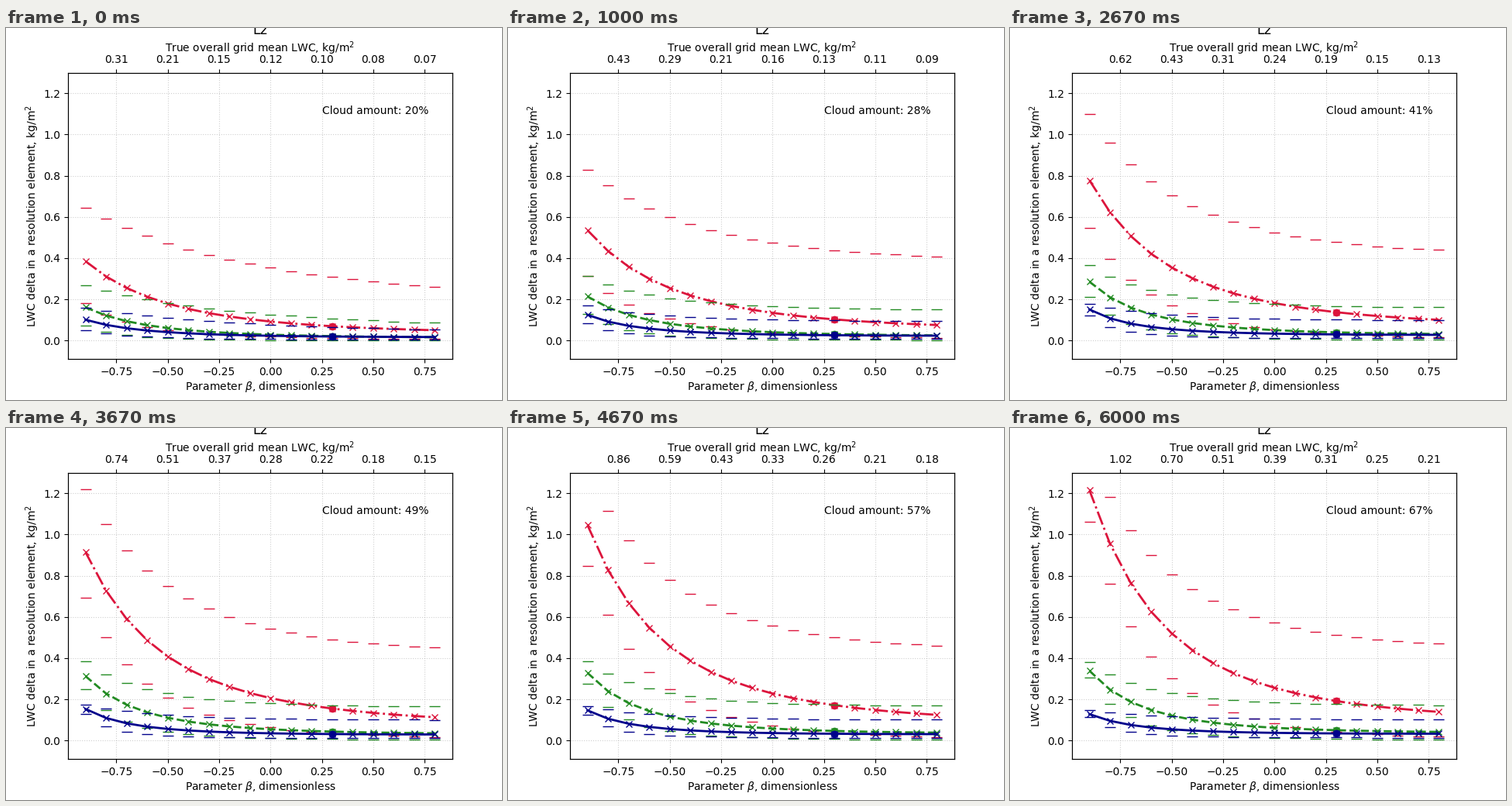
Recreate the animation shown at these times as a matplotlib script. Size 640x480 px, loop 6330 ms.

```python
import numpy as np
import matplotlib.pyplot as plt
from matplotlib.animation import FuncAnimation

FRAMES, LOOP_MS = 19, 6330
BETA = np.linspace(-0.9, 0.8, 18)
TICKS = np.linspace(-0.75, 0.75, 7)
HIGHLIGHT = 12  # index of beta = 0.3


def falling(left, right, bend):
    """Bent exponential decay whose ends drift with progress c in 0..1.

    left: start, end, hump; right: start, end, power; bend: start, end.
    """
    def value(count, c):
        s = np.linspace(0, 1, count)
        eased = c ** right[2]
        first = left[0] + (left[1] - left[0]) * c + left[2] * np.sin(np.pi * c)
        last = right[0] + (right[1] - right[0]) * eased
        curl = bend[0] + (bend[1] - bend[0]) * eased
        return last * (first / last) ** ((1 - s) * np.exp(-curl * s))
    return value


grid_mean = falling((0.308, 1.02, 0), (0.068, 0.21, 1), (0.61, 0.51))

# Colour, line style, then the mean, upper and lower curves.
STYLES = [
    ("crimson", "-.",
     falling((0.385, 1.214, 0.024), (0.050, 0.139, 0.7), (0.85, 0.97)),
     falling((0.644, 1.400, 0.120), (0.260, 0.471, 0.2), (0.63, 1.85)),
     falling((0.181, 1.062, -0.028), (0.008, 0.018, 0.3), (1.1, 0.42))),
    ("forestgreen", "--",
     falling((0.161, 0.338, 0.046), (0.016, 0.042, 0.6), (1.2, 1.75)),
     falling((0.268, 0.379, 0.050), (0.086, 0.172, 0.15), (0.6, 3.1)),
     falling((0.074, 0.304, 0.035), (0.001, 0.005, 0.5), (1.3, 1.3))),
    ("darkblue", "-",
     falling((0.101, 0.128, 0.038), (0.017, 0.033, 0.5), (1.9, 3.1)),
     falling((0.159, 0.148, 0.024), (0.053, 0.103, 0.1), (0.6, 3.0)),
     falling((0.051, 0.114, 0.042), (0.005, 0.014, 0.4), (2.1, 4.6))),
]

plt.rcParams["axes.labelpad"] = 2.4
fig, ax = plt.subplots(figsize=(6.4, 4.8), dpi=100)
ax.set(xlim=(-0.985, 0.885), ylim=(-0.09, 1.3),
       xlabel=r"Parameter $\beta$, dimensionless",
       ylabel="LWC delta in a resolution element, kg/m$^2$")
ax.set_xticks(TICKS)
ax.set_yticks(np.arange(0, 1.3, 0.2))
ax.grid(linestyle=":", alpha=0.6)
top = ax.twiny()
top.set(xlim=ax.get_xlim(), xlabel="True overall grid mean LWC, kg/m$^2$")
fig.text(328 / 640, 472 / 480, "L2", fontsize=12, ha="center")
amount = ax.text(0.25, 1.1, "")

series = []
for color, style, mean, high, low in STYLES:
    line, = ax.plot(BETA, BETA, style, color=color, lw=2, marker="x")
    upper, lower = (ax.plot(BETA, BETA, "_", color=color, ms=10)[0]
                    for _ in range(2))
    dot, = ax.plot([BETA[HIGHLIGHT]], [0], "o", color=color)
    series.append(([(line, mean), (upper, high), (lower, low)], dot))


def draw(frame):
    c = frame / (FRAMES - 1)
    for curves, dot in series:
        for artist, value in curves:
            artist.set_ydata(value(len(BETA), c))
        dot.set_ydata([curves[0][0].get_ydata()[HIGHLIGHT]])
    top.set_xticks(TICKS, [f"{v:.2f}" for v in grid_mean(len(TICKS), c)])
    amount.set_text(f"Cloud amount: {20 + 47 * c:.0f}%")
    return []


anim = FuncAnimation(fig, draw, frames=FRAMES, init_func=lambda: draw(0),
                     interval=LOOP_MS / FRAMES, repeat=True, repeat_delay=0)
plt.show()
```
